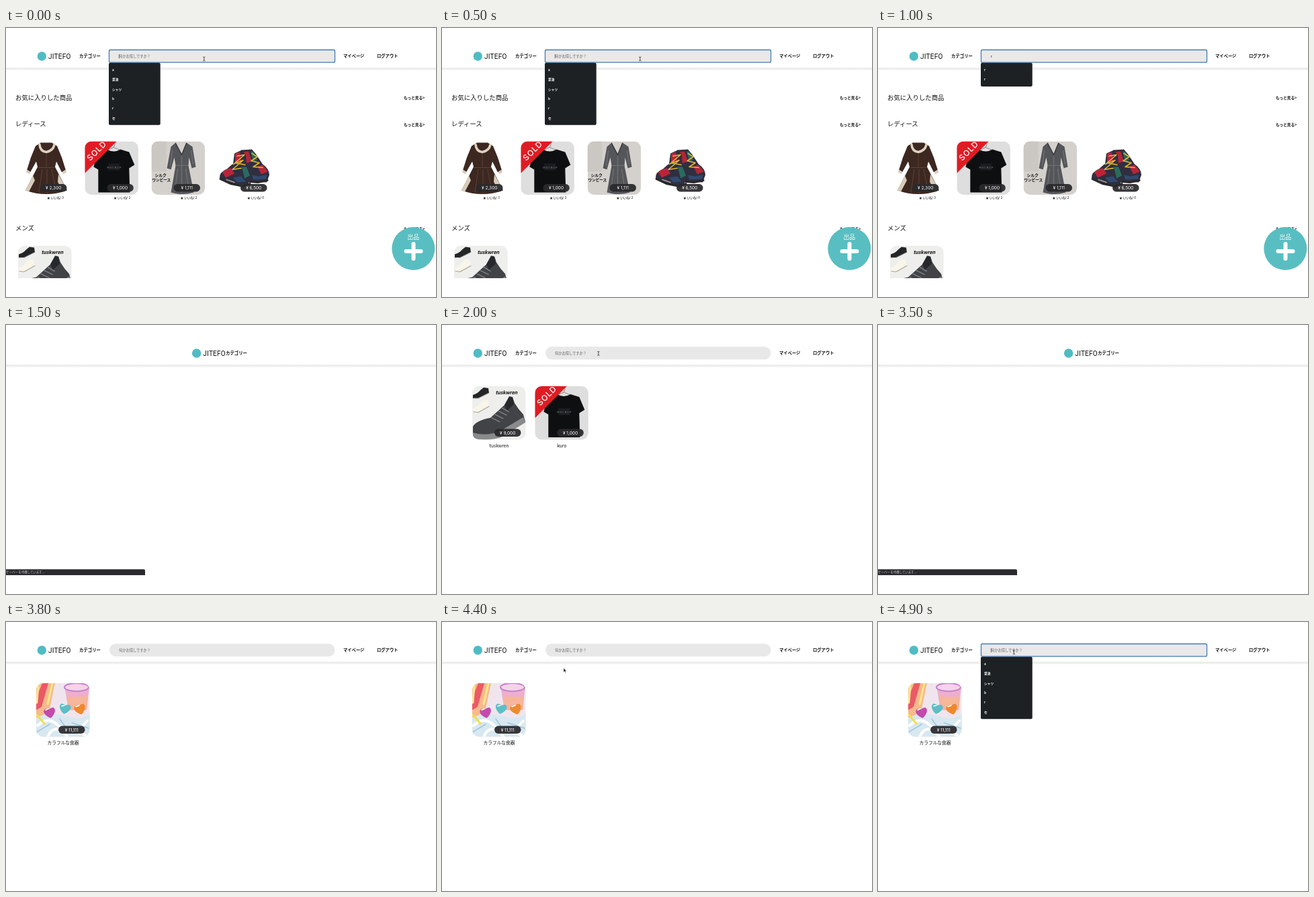
Recreate the animation shown at these times as an HTML page. Size 640 by 400 pixels, loop 5000 ms.

```html
<!DOCTYPE html>
<html lang="ja">
<head>
<meta charset="utf-8">
<style>
  html, body { margin: 0; width: 100%; height: 100%; overflow: hidden; background: #fff; }
  svg { display: block; font-family: "Noto Sans CJK JP", "Noto Sans CJK", sans-serif; }
  .latin { font-family: Inter, sans-serif; }
</style>
</head>
<body>
<svg id="stage" width="640" height="400" viewBox="0 0 640 400"></svg>
<script>
const stage = document.getElementById('stage');
const text = (x, y, size, str, attrs = '') =>
  `<text x="${x}" y="${y}" font-size="${size}" fill="#111" ${attrs}>${str}</text>`;
const path = (d, fill, attrs = '') => `<path d="${d}" fill="${fill}" ${attrs}/>`;
const line = (d, color, width) =>
  path(d, 'none', `stroke="${color}" stroke-width="${width}" stroke-linecap="round" stroke-linejoin="round"`);
const rect = (x, y, w, h, fill, r = 0) =>
  `<rect x="${x}" y="${y}" width="${w}" height="${h}" rx="${r}" fill="${fill}"/>`;
const group = (id, body, attrs = '') => `<g id="${id}" ${attrs}>${body}</g>`;
const middle = 'text-anchor="middle"', medium = 'font-weight="500"', bold = 'font-weight="700"';

// Product pictures, each in an 80 x 80 box
const heart = (x, y, turn, fill) =>
  path('M0 9C-14 0-8-10 0-4C8-10 14 0 0 9Z', fill, `transform="translate(${x} ${y}) rotate(${turn})"`);

const photos = {
  dress:
    path('M34 2L26 7L19 24L13 43L18 46L27 30L29 38L11 73Q42 84 73 73L55 38L57 30L65 46L71 43L65 24L58 7L50 2Z', '#3c2821') +
    path('M22 51L11 73L16 75L25 58ZM60 49L72 71L66 75L59 60Z', '#d8cbb9') +
    path('M13 42L18 45L17 49L12 46ZM66 45L71 42L72 46L67 49Z', '#d8cbb9') +
    line('M32 5Q33 15 42 16Q52 14 54 5', '#ded2c0', 3.5) +
    line('M42 18V38M30 39H54M36 42L31 76M43 42V78M50 42L57 76', '#5a4034', 1),
  tee:
    rect(0, 0, 80, 80, '#dedede') +
    line('M43 9Q47 3 42 1M31 14L43 9L55 14', '#8b8580', 1) +
    path('M33 12Q43 18 53 12L66 16L74 35L66 40L67 76H20L20 42L13 38L19 17Z', '#0e0f11') +
    rect(35, 33, 17, 10, '#1b1d20') +
    text(43.5, 40, 4, 'M O C K U P', `${middle} style="fill:#858585"`),
  onepiece:
    rect(0, 0, 80, 80, '#d4d1cd') + rect(0, 0, 22, 45, '#cbc7c3') +
    path('M36 2L29 8L23 40L29 42L34 24L36 36L29 76Q46 81 63 76L55 36L56 24L60 40L66 38L61 8L52 2L45 20Z', '#55565a') +
    line('M36 3L45 20L52 3', '#39393c', 1.5) +
    line('M36 36H55M39 41L35 74M45 22V76M51 41L56 74M31 14L28 36M59 14L62 34', '#717276', 1.2) +
    text(5, 52, 5.8, 'シルク', bold) + text(1, 59.5, 5.6, 'ワンピース', bold),
  boots:
    path('M34 13L50 12L56 19L66 34Q76 41 76 50L72 61L46 60L40 38Z', '#302f40') +
    path('M37 16L45 15L50 30L41 33ZM58 37L66 35L74 45L64 49Z', '#b32637') +
    path('M48 15L53 16L58 28L52 30Z', '#28675e') + path('M50 50L60 52L72 50L71 56L52 57Z', '#2f4a70') +
    line('M47 60L59 61L73 58', '#2a2729', 3) +
    path('M24 18L35 13L41 20L42 36L49 54L43 66L18 63L2 55Q1 46 13 41L22 33Z', '#302f40') +
    path('M25 18L32 16L34 28L25 33ZM6 46Q12 40 19 40L24 48L11 54Z', '#bd2338') +
    path('M35 38L42 38L47 51L39 55Z', '#296b61') + path('M22 54L34 52L41 60L28 61Z', '#2f4a70') +
    line('M3 56L18 63L38 67L47 63', '#2a2729', 3) + line('M12 57L24 61', '#a7a0a0', 1.5) +
    line('M22 34L37 28L21 42L34 40M28 22L39 20L25 32L40 35M50 18L58 23L49 29L61 32L52 38L66 39', '#e3b83a', 1.6),
  sneaker:
    rect(0, 0, 80, 80, '#eeeeed') +
    path('M1 13Q8 11 12 6L17 2L24 3L25 10L9 18L1 18Z', '#242527') + line('M2 18L9 18L25 10', '#aaa', 1) +
    path('M1 33Q8 31 12 25L17 20L23 21L25 30L9 39L1 38Z', '#f8f5e9') + line('M2 38L9 39L25 30', '#a9a496', 1.2) +
    path('M1 60Q6 51 27 47L48 28L55 15L60 16L63 25Q69 35 76 42L79 53L43 73Q15 80 1 73Z', '#414346') +
    path('M48 28L55 16L60 17L62 27L52 36Z', '#26282b') +
    path('M1 69Q20 75 41 67L76 46L79 54L43 76Q18 83 1 77Z', '#898a8c') +
    line('M29 47L41 53M34 42L46 48M39 37L51 43M44 32L54 38', '#777a7e', 1.5) +
    text(34.5, 12, 7.3, 'tuskwren', 'font-weight="700" font-style="italic" letter-spacing="-.2"'),
  glassware:
    rect(0, 0, 80, 80, '#f0e5ed') +
    path('M0 0H28L19 42L0 53Z', '#f7ba8b') + path('M9 0H18L8 35L0 40V22Z', '#ec5966') +
    line('M24 0L17 31M3 3L1 29', '#fae68d', 3) +
    path('M42 4H79L75 40H48Z', '#edafcc') + path('M46 20H77L75 39H49Z', '#f5b69b') +
    `<ellipse cx="60" cy="6" rx="18" ry="6" fill="#f5d3e9" stroke="#c681cf" stroke-width="2"/>` +
    path('M0 51Q23 42 45 49T80 45V80H0Z', '#d8e8f0') +
    line('M2 63Q18 47 35 65T76 56M17 80Q27 57 46 79M49 69L73 77', '#fff', 4) +
    line('M0 73L20 61M35 53L49 73M53 59L78 67', '#9fc6dd', 1.5) +
    line('M1 47L12 60', '#efdf50', 3) +
    heart(20, 43, -12, '#c44aab') + heart(43, 37, 10, '#5dbec5') + heart(65, 38, -18, '#ee892e') +
    line('M14 40L18 38M38 34L42 33M59 35L64 33', '#fff', 1.5)
};

const sold = path('M0 0H47.5L0 47.5Z', '#df1c24') +
  text(0, 4.4, 12, 'SOLD', `class="latin" ${middle} ${medium} letter-spacing=".8" transform="translate(17.5 14) rotate(-45)" style="fill:#fff"`);

function card(x, y, photo, price, { isSold, likes, name } = {}) {
  return `<g transform="translate(${x} ${y})"><g clip-path="url(#round)">${photos[photo]}${isSold ? sold : ''}</g>` +
    rect(33, 63.5, 39.5, 11.5, '#29292cee', 5.7) +
    text(52.7, 71.6, 6.5, `¥ ${price}`, `class="latin" ${middle} style="fill:#fff"`) +
    (likes === undefined ? '' : text(43, 85.5, 4.7, `★ いいね! ${likes}`, medium)) +
    (name ? text(40, 91, 6.7, name, `${middle} ${medium}`) : '') + '</g>';
}

const heading = (y, str) => text(14, y, 9.4, str, medium);
const more = y => text(592, y, 5.6, 'もっと見る&gt;', bold);

const home =
  heading(106.5, 'お気に入りした商品') + heading(146, 'レディース') + heading(301, 'メンズ') +
  more(106) + more(146) + more(301) +
  card(18, 168.5, 'dress', '2,300', { likes: 3 }) +
  card(117.3, 168.5, 'tee', '1,000', { isSold: true, likes: 2 }) +
  card(216.5, 168.5, 'onepiece', '1,111', { likes: 2 }) +
  card(316, 168.5, 'boots', '6,500', { likes: 0 }) +
  card(18, 323.5, 'sneaker', '9,000') +
  '<circle cx="606.3" cy="328" r="32" fill="#59bec1"/>' +
  text(606.3, 313.7, 8.8, '出品', `${middle} ${medium} style="fill:#fff"`) +
  line('M595.5 332H617.5M606.5 321V343', '#fff', 6);

const menu = (id, items) => group(id,
  rect(153, 51.7, 76.7, 6.8 + items.length * 14.3, '#1d2123', 2) +
  items.map((s, i) => text(158, 64 + i * 14.3, 4.7, s, `${bold} style="fill:#fff"`)).join(''));

stage.innerHTML = `
  <defs>
    <clipPath id="round"><rect width="79.5" height="79.5" rx="10"/></clipPath>
    <clipPath id="screen"><rect width="640" height="372"/></clipPath>
    <linearGradient id="shade" x2="0" y2="1">
      <stop stop-color="#fff"/><stop offset=".45" stop-color="#e9e9e9"/><stop offset="1" stop-color="#fff"/>
    </linearGradient>
  </defs>` +
  rect(0, 58, 640, 5.5, 'url(#shade)') +
  group('logo', '<circle cx="53.3" cy="42" r="6.7" fill="#4fbcc4"/>' +
    text(63, 45.8, 10, 'JITEFO', 'letter-spacing=".25" font-family="Roboto, sans-serif"')) +
  group('category', text(109, 44.3, 6.4, 'カテゴリー', bold)) +
  group('nav', text(502, 44.3, 6.3, 'マイページ', bold) + text(552, 44.3, 6.3, 'ログアウト', bold) +
    group('pill', rect(154, 32.3, 335.5, 19, '#e8e8e8', 9.5)) +
    group('focus', '<rect x="153.5" y="32.5" width="336" height="18.7" rx="2" fill="#e9e9e9" stroke="#447bb5" stroke-width="1.3"/>') +
    group('hint', text(168, 43.9, 5.25, '何かお探しですか？', 'style="fill:#606060"')) +
    group('caret', line('M168.3 39.5V44.8', '#222', .6)) +
    text(168, 43.9, 5.2, '', `id="query" ${medium}`)) +
  group('home', home, 'clip-path="url(#screen)"') +
  group('results', card(45, 91, 'sneaker', '9,000', { name: 'tuskwren' }) +
    card(138.3, 91, 'tee', '1,000', { isSold: true, name: 'kuro' })) +
  group('match', card(45, 91, 'glassware', '11,111', { name: 'カラフルな食器' })) +
  menu('allWords', ['a', '醤油', 'シャツ', 'b', 'r', 'セ']) +
  menu('rWords', ['r', 'r']) +
  group('status', path('M0 363.3H205Q207 363.3 207 365.3V372H0Z', '#2b2a2f') +
    text(0, 369.3, 4.4, 'サーバー を待機しています...', 'style="fill:#c4c4c6"')) +
  group('beam', line('M-1.3-3Q0-3 0-2V2Q0 3-1.3 3M1.3-3Q0-3 0-2M0 2Q0 3 1.3 3', '#333', .8)) +
  group('arrow', path('M0 0V6L1.4 4.8L2.3 7L3.3 6.5L2.3 4.4H4.2Z', '#111', 'stroke="#fff" stroke-width=".4"'));

const el = id => document.getElementById(id);
const show = (id, on) => el(id).setAttribute('display', on ? 'inline' : 'none');
const place = (id, x, y) => el(id).setAttribute('transform', `translate(${x} ${y})`);

function draw(ms) {
  const step = Math.floor(ms % 5000 / 100);
  const within = (from, to) => step >= from && step < to;
  const blank = within(15, 18) || within(34, 36);
  const focused = step < 15 || within(24, 34) || step >= 48;
  const query = within(6, 15) ? 'r' : within(28, 34) ? 'カ' : '';

  show('home', step < 15);
  show('results', within(18, 34));
  show('match', step >= 36);
  show('nav', !blank);
  place('logo', blank ? 230.3 : 0, 0);
  place('category', blank ? 218 : 0, 0);
  show('status', within(12, 19) || within(33, 37));

  show('pill', !focused);
  show('focus', focused);
  show('hint', !query);
  show('caret', focused && !query);
  el('query').textContent = query;
  show('allWords', step < 6 || within(25, 28) || step >= 48);
  show('rWords', within(6, 12));

  show('beam', step < 6 || within(19, 28) || step >= 47);
  place('beam', ...(step < 6 ? [294.8, 46] : step < 28 ? [232.8, 42.3] : [202.3, 45]));
  show('arrow', within(42, 47));
  place('arrow', 181, 68.5);
}

function tick() {
  draw(performance.now());
  requestAnimationFrame(tick);
}
tick();
</script>
</body>
</html>
```
